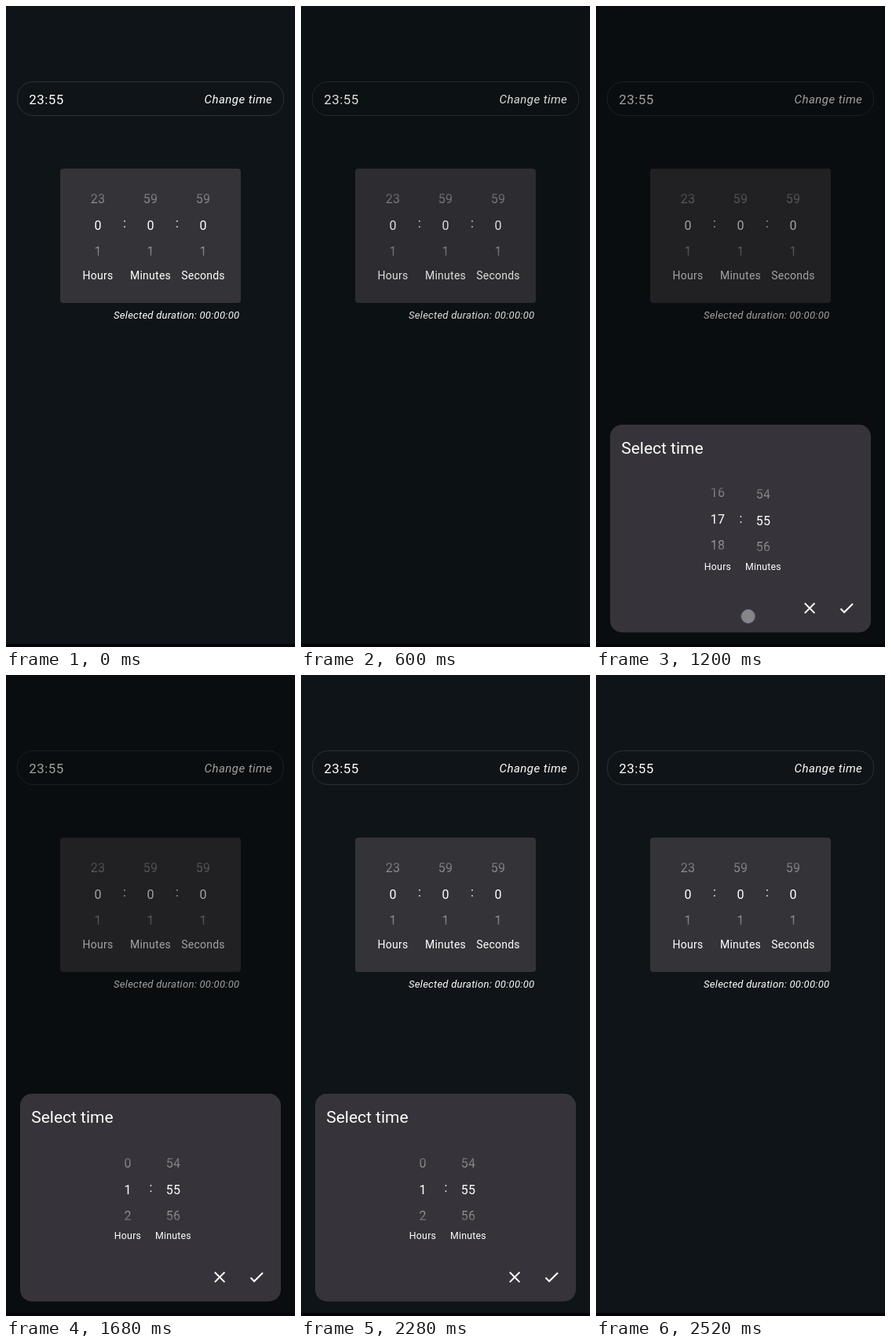
An HTML page for the animation above (2.64 s loop, 368 by 816 pixels).

```html
<!DOCTYPE html>
<html lang="en">
<head>
<meta charset="utf-8">
<title>Time picker</title>
<style>
  html, body { margin: 0; width: 100%; height: 100%; overflow: hidden; background: #0e1417; }
  svg { display: block; width: 100%; height: 100%; --row: 33.4px; }
  text { font-family: Roboto, sans-serif; fill: #fff; white-space: pre; }
  .mid { text-anchor: middle; }
  .end { text-anchor: end; }
  .italic { font-style: italic; }
  .clock { font-size: 16.9px; letter-spacing: .45px; }
  .change { font-size: 15px; letter-spacing: .45px; }
  .duration { font-size: 13.1px; letter-spacing: .23px; }
  .digit { font-size: 16px; letter-spacing: .2px; }
  .label { font-size: 14px; letter-spacing: .25px; }
  .small { font-size: 12.3px; letter-spacing: .25px; }
  .title { font-size: 21px; }
  .icon { fill: none; stroke: #fff; stroke-width: 2; }

  /* The screen refreshes in 120 ms steps: 22 per loop */
  #scrim, #sheet, #touch, .spin { animation: 2640ms step-end infinite; }
  #scrim { animation-name: scrim; }
  #sheet { animation-name: sheet; }
  #touch { animation-name: touch; }
  .spin { animation-name: spin; }

  @keyframes scrim {
    0% { opacity: 0; }
    22.72% { opacity: .13; }
    27.27% { opacity: .34; }
    31.81% { opacity: .37; }
    81.81% { opacity: .18; }
    86.36%, 100% { opacity: 0; }
  }
  @keyframes sheet {
    0% { opacity: 0; transform: translateY(10.5px); }
    27.27% { opacity: 1; transform: translateY(10.5px); }
    31.81% { opacity: 1; transform: none; }
    90.9%, 100% { opacity: 0; transform: none; }
  }
  @keyframes spin {
    0% { transform: translateY(calc(var(--row) * -23)); }
    40.9% { transform: translateY(calc(var(--row) * -21.1)); }
    45.45% { transform: translateY(calc(var(--row) * -17.06)); }
    49.99% { transform: translateY(calc(var(--row) * -9.3)); }
    54.54% { transform: translateY(calc(var(--row) * -3.7)); }
    59.09% { transform: translateY(calc(var(--row) * -.8)); }
    63.63%, 100% { transform: translateY(calc(var(--row) * -1)); }
  }
  @keyframes touch {
    0% { opacity: 0; transform: translate(296px, 110.5px); }
    4.54% { opacity: 1; transform: translate(296px, 110.5px); }
    13.63% { opacity: .4; transform: translate(296px, 110.5px); }
    18.18% { opacity: 0; transform: translate(172px, 682px); }
    40.9% { opacity: 1; transform: translate(172px, 682px); }
    45.45% { opacity: 1; transform: translate(193.7px, 777px); }
    49.99% { opacity: 0; transform: translate(272px, 768px); }
    72.72% { opacity: 1; transform: translate(272px, 768px); }
    81.81% { opacity: .4; transform: translate(272px, 768px); }
    86.36%, 100% { opacity: 0; transform: translate(272px, 768px); }
  }
</style>
</head>
<body>
<svg viewBox="0 0 368 816">
  <defs>
    <linearGradient id="fade" x1="0" y1="0" x2="0" y2="1">
      <stop offset="0" stop-color="#fff" stop-opacity="0"/>
      <stop offset=".11" stop-color="#fff" stop-opacity=".3"/>
      <stop offset=".23" stop-color="#fff" stop-opacity=".48"/>
      <stop offset=".34" stop-color="#fff"/>
      <stop offset=".66" stop-color="#fff"/>
      <stop offset=".77" stop-color="#fff" stop-opacity=".48"/>
      <stop offset=".89" stop-color="#fff" stop-opacity=".3"/>
      <stop offset="1" stop-color="#fff" stop-opacity="0"/>
    </linearGradient>
    <mask id="window" maskUnits="userSpaceOnUse" x="-20" y="-50" width="40" height="100" style="mask-type: alpha">
      <rect x="-20" y="-50" width="40" height="100" fill="url(#fade)"/>
    </mask>
  </defs>

  <rect width="368" height="816" fill="#0e1417"/>
  <rect x="14.5" y="96.5" width="339" height="43" rx="20" fill="none" stroke="#2b3134"/>
  <text class="clock" x="29.3" y="124.6">23:55</text>
  <text class="change italic end" x="339.3" y="124.2">Change time</text>

  <rect x="69" y="207" width="230" height="171" rx="4" fill="#343338"/>
  <g id="durationWheels"></g>
  <text class="digit mid" x="151" y="281.6">:</text>
  <text class="digit mid" x="218" y="281.6">:</text>
  <text class="label mid" x="117" y="348.3">Hours</text>
  <text class="label mid" x="184" y="348.3">Minutes</text>
  <text class="label mid" x="251" y="348.3">Seconds</text>
  <text class="duration italic end" x="297.4" y="397.8">Selected duration: 00:00:00</text>

  <rect id="scrim" width="368" height="816"/>
  <rect y="812" width="368" height="4" fill="#060309"/>

  <g id="sheet">
    <rect x="18" y="533" width="332" height="264.5" rx="15" fill="#36343a"/>
    <text class="title" x="32.2" y="570.3">Select time</text>
    <g id="timeWheels"></g>
    <text class="digit mid" x="184.6" y="657.6">:</text>
    <text class="small mid" x="155" y="717.8">Hours</text>
    <text class="small mid" x="213" y="717.8">Minutes</text>
    <path class="icon" d="M265.8 760.3l12.6 12.6m0-12.6l-12.6 12.6"/>
    <path class="icon" d="M311.5 767.2l4.6 4.6 10.9-10.8"/>
  </g>

  <circle id="touch" r="8.5" fill="#fff" fill-opacity=".4" stroke="#8795b5" stroke-opacity=".7"/>
</svg>
<script>
  const ROW = 33.4;

  function add(parent, tag, attrs, text = '') {
    const node = document.createElementNS(parent.namespaceURI, tag);
    for (const name in attrs) node.setAttribute(name, attrs[name]);
    node.textContent = text;
    return parent.appendChild(node);
  }

  // Stacks the numbers first..last (wrapping at count) with row 0 at (x, y).
  function addWheel(id, x, y, first, last, count, spinning) {
    const frame = add(document.getElementById(id), 'g', {
      transform: `translate(${x} ${y})`, mask: 'url(#window)'
    });
    const strip = add(frame, 'g', spinning ? { class: 'spin' } : {});
    for (let i = first; i <= last; i++) {
      add(strip, 'text', { class: 'digit mid', y: i * ROW + 5.7 }, (i + count) % count);
    }
  }

  addWheel('durationWheels', 117, 279, -1, 1, 24);
  addWheel('durationWheels', 184, 279, -1, 1, 60);
  addWheel('durationWheels', 251, 279, -1, 1, 60);
  addWheel('timeWheels', 155, 655, -2, 25, 24, true);
  addWheel('timeWheels', 213, 655, 54 - 55, 56 - 55, 60);

  const minutes = document.querySelectorAll('#timeWheels > g:last-child text');
  minutes.forEach((node, i) => node.textContent = 54 + i);
</script>
</body>
</html>
```
